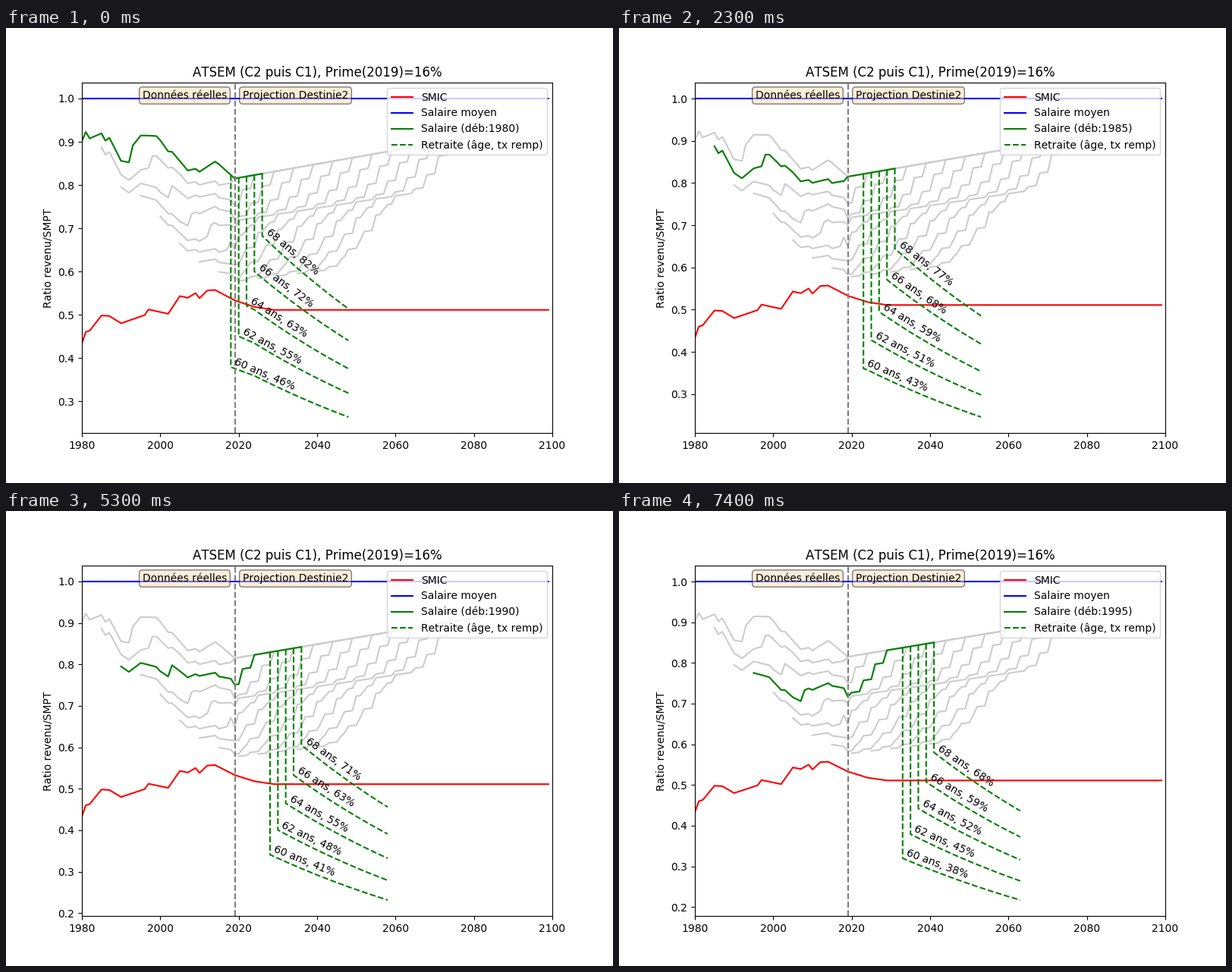
A matplotlib script that plays this animation: 800x600 px, repeating every 8 s.

```python
import numpy as np
import matplotlib.pyplot as plt
from matplotlib.animation import FuncAnimation

plt.rcParams["font.family"] = "DejaVu Sans"
plt.rcParams["text.kerning_factor"] = 6


def curve(*points):
    """Piecewise linear function through (x, y) points, flat outside."""
    xs, ys = zip(*points)
    return lambda x: np.interp(x, xs, ys)


# Minimum wage relative to the mean wage
smic = curve((1980, .433), (1981, .46), (1982, .463), (1985, .498),
             (1987, .497), (1990, .48), (1996, .499), (1997, .512),
             (2002, .502), (2005, .543), (2007, .539), (2009, .55),
             (2010, .538), (2012, .556), (2014, .557), (2019, .533),
             (2024, .518), (2029, .511))

# Value of the pay point relative to the mean wage, 1 in 2019
point = curve((1980, 1.565), (1981, 1.59), (1982, 1.553), (1985, 1.54),
              (1986, 1.5), (1987, 1.5), (1990, 1.38), (1992, 1.338),
              (1995, 1.346), (1999, 1.29), (2002, 1.21), (2003, 1.2),
              (2007, 1.108), (2009, 1.097), (2010, 1.08), (2014, 1.06),
              (2015, 1.04), (2019, 1), (2100, 1.159))

# Pay scale by years of service: smooth until 2018, then in steps
old_scale = curve((0, .576), (5, .597), (10, .62), (12, .637), (13, .665),
                  (20, .715), (25, .741), (30, .769), (35, .815))
STEP_YEARS = [0, 3, 6, 7, 8, 11, 12, 15, 17, 18, 20, 25, 28, 31, 34]
STEP_PAY = [.577, .583, .594, .602, .616, .632, .65, .682, .692, .701,
            .717, .7255, .751, .786, .815]

COHORTS = range(1980, 2041, 5)
CAREER = 46
# Share of the last wage kept when retiring at 60, 62, 64, 66 and 68
RATES = {
    1980: (.460, .551, .635, .729, .826),
    1985: (.439, .519, .598, .687, .773),
    1990: (.411, .481, .556, .635, .719),
    1995: (.382, .451, .524, .599, .682),
}


def wage(start, year):
    served = year - start
    if year < 2019:
        return old_scale(served) * point(year)
    step = np.searchsorted(STEP_YEARS, served, side="right") - 1
    return STEP_PAY[step] * point(year)


def career(start):
    years = range(start, start + CAREER + 1)
    return years, [wage(start, y) for y in years]


def pension(start, age, rate):
    """Years and values of a pension that only follows prices."""
    years = list(range(start + age - 22, start + 69))
    values = [rate * wage(start, years[0])]
    for y in years[:-1]:
        values.append(values[-1] / (1.009 if y < 2024 else 1.013))
    return years, values


fig, ax = plt.subplots(figsize=(8, 6), dpi=100)
fig.subplots_adjust(left=0.125, right=0.9, bottom=0.11, top=0.88)


def label_pension(xs, ys, text):
    """Write along the pension line, just above its start."""
    (x0, y0), (x1, y1) = ax.transData.transform([(xs[0], ys[0]),
                                                 (xs[22], ys[22])])
    angle = np.degrees(np.arctan2(y1 - y0, x1 - x0))
    ax.text(xs[0] + 0.5, ys[0] + 0.002, text, rotation=angle,
            rotation_mode="anchor", va="bottom")


def draw(k):
    start = 1980 + 5 * ((k + 5) // 6)
    ax.clear()

    for c in COHORTS:
        ax.plot(*career(c), color="0.8")
    years = np.arange(1980, 2100)
    ax.plot(years, smic(years), color="red", label="SMIC")
    ax.plot(years, np.ones(len(years)), color="blue", label="Salaire moyen")
    ax.plot(*career(start), color="green", label=f"Salaire (déb:{start})")

    plans = []
    for age, rate in zip(range(60, 69, 2), RATES[start]):
        xs, ys = pension(start, age, rate)
        ax.plot([xs[0]] + xs, [wage(start, xs[0])] + ys, "--", color="green",
                label="Retraite (âge, tx remp)" if age == 60 else None)
        plans.append((xs, ys, f"{age} ans, {int(100 * rate + 1e-6)}%"))

    ax.axvline(2019, color="grey", ls="--")
    ax.set_xlim(1980, 2100)
    ax.autoscale_view()
    for plan in plans:
        label_pension(*plan)

    box = dict(boxstyle="round", facecolor="wheat", alpha=0.5)
    ax.text(2017, 1, "Données réelles", ha="right", bbox=box)
    ax.text(2021, 1, "Projection Destinie2", ha="left", bbox=box)
    ax.set_ylabel("Ratio revenu/SMPT")
    ax.set_title("ATSEM (C2 puis C1), Prime(2019)=16%")
    ax.legend(loc="upper right")
    return []


anim = FuncAnimation(fig, draw, frames=16, interval=500, init_func=lambda: [],
                     repeat=True, repeat_delay=0)
plt.show()
```
